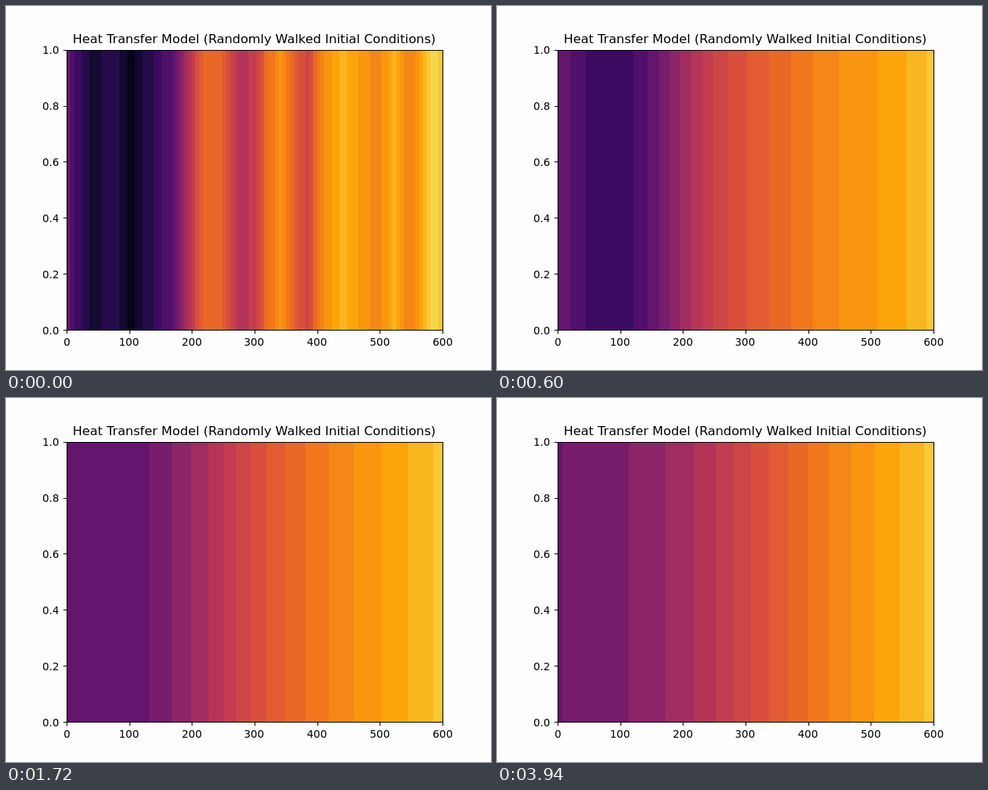
An HTML page with a canvas for the animation above (4000 ms loop, 640 by 480 pixels).

```html
<!DOCTYPE html>
<html lang="en">
<head>
<meta charset="utf-8">
<title>Heat transfer</title>
<style>
  html, body { margin: 0; width: 100%; height: 100%; overflow: hidden; background: #fefefe; }
  canvas, svg { position: absolute; left: 0; top: 0; }
  svg { font-family: "DejaVu Sans", sans-serif; }
</style>
</head>
<body>
<canvas width="640" height="480"></canvas>
<svg width="640" height="480"></svg>
<script>
const LEFT = 80, RIGHT = 576, TOP = 57.6, BOTTOM = 427.2, WIDTH = RIGHT - LEFT;
const FRAME = 20, LOOP = 4000;
const CELL = 5;                      // width of one step of the walk
const SUBSTEPS = 90, RATE = .45;     // conduction per frame

// Turning points of the walk: x, temperature
const walk = [
  [80, .308], [90, .22], [104, .14], [115, .085], [135, .14], [152, .1], [163, .02], [174, .09],
  [200, .185], [220, .27], [235, .38], [250, .56], [264, .66], [284, .66], [298, .55], [311, .48],
  [330, .54], [345, .67], [361, .76], [375, .69], [385, .62], [398, .55], [412, .69], [431, .8],
  [446, .83], [472, .77], [489, .715], [514, .825], [526, .735], [540, .735], [563, .9], [576, .865]
];

// Colour stops at every tenth of the temperature range
const stops = '000004 160b39 420a68 6a176e 932667 bc3754 dd513a f37819 fca50a f6d746 fcffa4'
  .split(' ').map(hex => hex.match(/../g).map(c => parseInt(c, 16)));

const mix = (a, b, t) => a + (b - a) * t;

function walkAt(x) {
  const i = walk.findIndex(p => p[0] >= x);
  const [x0, v0] = walk[i - 1], [x1, v1] = walk[i];
  return mix(v0, v1, (x - x0) / (x1 - x0));
}

// Temperatures are shown in flat levels, finer on the hot side
function colorOf(v) {
  const middle = .485, step = v < middle ? .05 : .035;
  const level = Math.max(0, middle + step * Math.round((v - middle) / step)) * 10;
  const i = Math.floor(level);
  return `rgb(${stops[i].map((c, k) => Math.round(mix(c, stops[i + 1][k], level - i)))})`;
}

// One frame of heat conduction with both ends held fixed
function conduct(rod) {
  let now = rod.slice(), next = rod.slice();
  for (let n = 0; n < SUBSTEPS; n++) {
    for (let i = 1; i < WIDTH - 1; i++)
      next[i] = now[i] + RATE * (now[i - 1] - 2 * now[i] + now[i + 1]);
    [now, next] = [next, now];
  }
  return now;
}

const rods = [Float64Array.from({ length: WIDTH }, (_, i) =>
  walkAt(Math.min(RIGHT, LEFT + (Math.floor(i / CELL) + .5) * CELL)))];
rods[0][0] = walk[0][1];
rods[0][WIDTH - 1] = walk[walk.length - 1][1];
while (rods.length < LOOP / FRAME) rods.push(conduct(rods[rods.length - 1]));

const ctx = document.querySelector('canvas').getContext('2d');

// Text whose ink starts on a whole pixel; align 0.5 is centred, 1 is right
function label(text, x, y, size, align) {
  ctx.font = `${size}px "DejaVu Sans", sans-serif`;
  const box = ctx.measureText(text), bearing = -box.actualBoundingBoxLeft;
  const start = Math.round(x - (box.width - bearing) * align) - bearing;
  return `<text x="${start}" y="${Math.round(y)}" font-size="${size}">${text}</text>`;
}

function drawAxes() {
  const snap = v => Math.floor(v + .5) + .5;
  const l = snap(LEFT), r = snap(RIGHT), t = snap(TOP), b = snap(BOTTOM);
  const small = 13.889, large = 16.667, tick = 4.86, gap = 9.72, ascent = 11;
  let path = `M${l} ${t}H${r}V${b}H${l}Z`;
  let text = label('Heat Transfer Model (Randomly Walked Initial Conditions)',
    (LEFT + RIGHT) / 2, 49, large, .5);
  for (let i = 0; i <= 6; i++) {
    const x = mix(LEFT, RIGHT, i / 6);
    path += `M${snap(x)} ${b}v${tick}`;
    text += label(String(i * 100), x, BOTTOM + gap + ascent, small, .5);
  }
  for (let i = 0; i <= 5; i++) {
    const y = mix(BOTTOM, TOP, i / 5);
    path += `M${l} ${snap(y)}h${-tick}`;
    text += label((i / 5).toFixed(1), LEFT - gap, y + ascent / 2, small, 1);
  }
  document.querySelector('svg').innerHTML =
    `<path d="${path}" fill="none" stroke="#000" stroke-width="1.11"/>${text}`;
}

function draw() {
  const rod = rods[Math.floor(performance.now() % LOOP / FRAME)];
  rod.forEach((v, i) => {
    ctx.fillStyle = colorOf(v);
    ctx.fillRect(LEFT + i, 58, 1, 370);
  });
  requestAnimationFrame(draw);
}

drawAxes();
draw();
</script>
</body>
</html>
```
